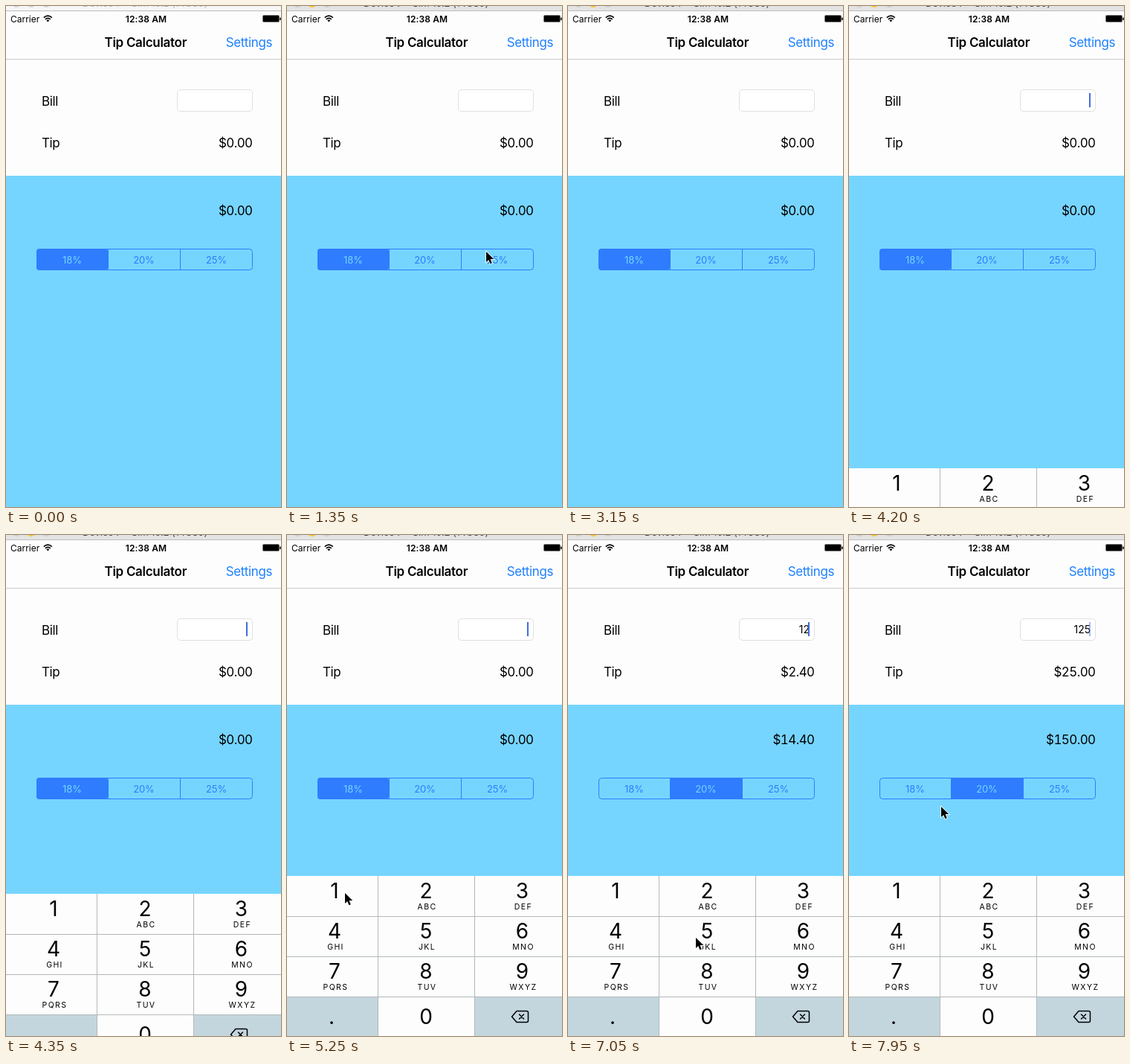
An HTML page for the animation above (8000 ms loop, 370 px wide and 673 px high).

```html
<!DOCTYPE html>
<html lang="en">
<head>
<meta charset="utf-8">
<title>Tip Calculator</title>
<style>
  html, body { margin: 0; width: 100%; height: 100%; overflow: hidden; }
  svg { display: block; width: 370px; height: 673px; background: #fdfdfd; }
  text { font: 17px Inter, sans-serif; letter-spacing: -.4px; }
  .mid { text-anchor: middle; }
  .end { text-anchor: end; }
  .money { text-anchor: end; letter-spacing: -.6px; font-variant-numeric: tabular-nums; }
  .small { font-size: 12px; letter-spacing: 0; }
  .bold { font-weight: 600; letter-spacing: -.3px; }
  .seg { font-size: 13px; letter-spacing: -.1px; text-anchor: middle; }
  .digit { font-size: 28px; letter-spacing: 0; text-anchor: middle; }
  .letters { font-size: 10.5px; letter-spacing: 1.4px; text-anchor: middle; }
</style>
</head>
<body>
<svg viewBox="0 0 370 673">
  <rect id="bar" width="370" height="6"/>
  <g id="dots"><circle cx="14" cy="-4" r="6"/><circle cx="34" cy="-4" r="6"/><circle cx="54" cy="-4" r="6"/></g>
  <text id="window" class="mid" x="187" y="1" style="font-size:13px;letter-spacing:-.1px">Device 7 – Sim 10.2 (14C89)</text>
  <path d="M0 6.5H370" stroke="#bdbdbd"/>

  <text class="small" x="6" y="21.5">Carrier</text>
  <g fill="none" stroke="#000" stroke-width="1.7">
    <path d="M50.8 15.6Q56.3 10.8 61.8 15.6M52.8 17.9Q56.3 14.8 59.8 17.9"/>
    <path d="M56.3 21.4L54.3 19.3Q56.3 17.9 58.3 19.3Z" fill="#000" stroke="none"/>
  </g>
  <text class="small bold mid" x="188.5" y="21.5" style="letter-spacing:.1px">12:38 AM</text>
  <rect x="345.5" y="12.5" width="22" height="9" rx="1.5" stroke="#777"/>
  <path d="M369 15.5v3.5" stroke="#000" stroke-width="1.5"/>

  <text class="bold mid" x="187.8" y="55">Tip Calculator</text>
  <text class="end" x="358" y="55" fill="#1f80ff">Settings</text>
  <path d="M0 71.5H370" stroke="#cbcbcb"/>

  <text x="48" y="133.5">Bill</text>
  <rect x="230.5" y="112.5" width="101" height="29" rx="4.5" fill="#fff" stroke="#e0e0e0"/>
  <text id="bill" class="end" x="325" y="132" style="font-size:14px;letter-spacing:0"></text>
  <rect id="caret" x="323" y="117" width="2" height="19" fill="#426bdd"/>
  <text x="48" y="189.5">Tip</text>
  <text id="tip" class="money" x="331.5" y="189.5"></text>

  <rect y="228" width="370" height="445" fill="#76d5ff"/>
  <text id="total" class="money" x="331.5" y="280.5"></text>
  <g id="segments"></g>
  <rect x="41.5" y="326.5" width="290" height="28" rx="4" fill="none" stroke="#2f7cff"/>
  <path d="M137.5 326V355M234.5 326V355" stroke="#2f7cff"/>

  <g id="keyboard">
    <rect width="370" height="215" fill="#fdfdfd"/>
    <g id="keys"></g>
    <path d="M122.5 0V215M252.5 0V215M0 54.5H370M0 108.5H370M0 162.5H370" stroke="#b4b8ba"/>
    <g fill="none" stroke="#000" stroke-width="1.5" stroke-linejoin="round" stroke-linecap="round">
      <path d="M302.5 189L309 181.5H322.5Q324.5 181.5 324.5 183.5V194.5Q324.5 196.5 322.5 196.5H309Z"/>
      <path d="M312.5 186l6 6m0-6l-6 6"/>
    </g>
  </g>
  <path id="pointer" d="M0 0V14L3.2 11L5.4 16.2L7.8 15.2L5.6 10.1H10.2Z" stroke="#fff" stroke-width="1.6" paint-order="stroke"/>
</svg>
<script>
const el = id => document.getElementById(id);
const LOOP = 8000, STEP = 150;
const GRAY = '#c3d6de', WHITE = '#fdfdfd', BLUE = '#2f7cff', SKY = '#76d5ff';

// Segmented control
const rates = [18, 20, 25];
const segmentX = [41, 137, 234, 332];
el('segments').innerHTML = rates.map((rate, i) => {
  const x = segmentX[i], w = segmentX[i + 1] - x;
  return `<rect x="${x}" y="326" width="${w}" height="29" rx="${i ? 0 : 4}"/>` +
    `<text class="seg" x="${x + w / 2}" y="345.5">${rate}%</text>`;
}).join('');
const segments = [...el('segments').children];

// Number pad
const labels = '1 2,ABC 3,DEF 4,GHI 5,JKL 6,MNO 7,PQRS 8,TUV 9,WXYZ . 0 '.split(' ');
const columnX = [0, 123, 253, 370], centerX = [64, 187, 316.5];
el('keys').innerHTML = labels.map((label, i) => {
  const col = i % 3, row = Math.floor(i / 3), top = row * 54;
  const [digit, letters = ''] = label.split(',');
  const x = centerX[col] - (digit === '.' ? 4 : 0);
  return `<rect x="${columnX[col]}" y="${top}" width="${columnX[col + 1] - columnX[col]}" height="54"/>` +
    `<text class="digit" x="${x}" y="${top + (row < 3 ? 30 : 37)}">${digit}</text>` +
    `<text class="letters" x="${centerX[col] + 1.5}" y="${top + 45}">${letters}</text>`;
}).join('');
const keys = [...el('keys').querySelectorAll('rect')];

// Pointer strokes: first step, last step, one point per step (the last one holds)
const strokes = [
  [7, 19, [[300, 499], [283, 420], [268, 330], [258, 255], [256, 190], [261, 140], [265, 128],
    [265, 128], [257, 146], [230, 215], [185, 310], [162, 341]]],
  [20, 20, [[310, 440]]],
  [32, 53, [[215, 400], [165, 430], [129, 482], [78, 481], [78, 481], [78, 481], [140, 400],
    [178, 341], [178, 341], [110, 440], [76, 482], [165, 485], [174, 486], [174, 486],
    [173, 510], [172, 541], [174, 543], [174, 543], [168, 500], [150, 437], [133, 385], [124, 365]]]
];

function pointerAt(n) {
  const stroke = strokes.find(([first, last]) => n >= first && n <= last);
  return stroke && stroke[2][Math.min(n - stroke[0], stroke[2].length - 1)];
}

function render(time) {
  const n = Math.floor(time / STEP);

  const active = n >= 7;
  el('bar').setAttribute('fill', active ? '#e3e3e3' : '#f6f6f6');
  el('window').setAttribute('fill', active ? '#444' : '#b5b5b5');
  el('dots').setAttribute('fill', active ? '#cfcfcf' : '#d8d8d8');
  el('dots').children[1].setAttribute('fill', active ? '#fdc42f' : '#d8d8d8');

  const selected = n >= 40 ? 1 : 0;
  rates.forEach((_, i) => {
    segments[2 * i].setAttribute('fill', i === selected ? BLUE : SKY);
    segments[2 * i + 1].setAttribute('fill', i === selected ? SKY : BLUE);
  });

  const bill = n >= 49 ? '125' : n >= 46 ? '12' : n >= 44 ? '1' : '';
  const tip = bill * rates[selected] / 100;
  el('bill').textContent = bill;
  el('tip').textContent = '$' + tip.toFixed(2);
  el('total').textContent = '$' + (+bill + tip).toFixed(2);
  el('caret').setAttribute('opacity', n < 28 ? 0 : n < 52 ? 1 : n < 53 ? .75 : .45);

  const pressed = n === 42 || n === 43 ? 0 : n === 45 ? 1 : n === 48 || n === 49 ? 4 : -1;
  keys.forEach((key, i) =>
    key.setAttribute('fill', i === pressed || i === 9 || i === 11 ? GRAY : WHITE));

  const drop = n < 28 ? 215 : Math.round(163 * Math.exp(-(n - 28) * 1.9));
  el('keyboard').setAttribute('transform', `translate(0 ${458 + drop})`);

  const point = pointerAt(n);
  el('pointer').setAttribute('visibility', point ? 'visible' : 'hidden');
  if (point) el('pointer').setAttribute('transform', `translate(${point})`);
}

function tick() {
  render(performance.now() % LOOP);
  requestAnimationFrame(tick);
}
tick();
</script>
</body>
</html>
```
